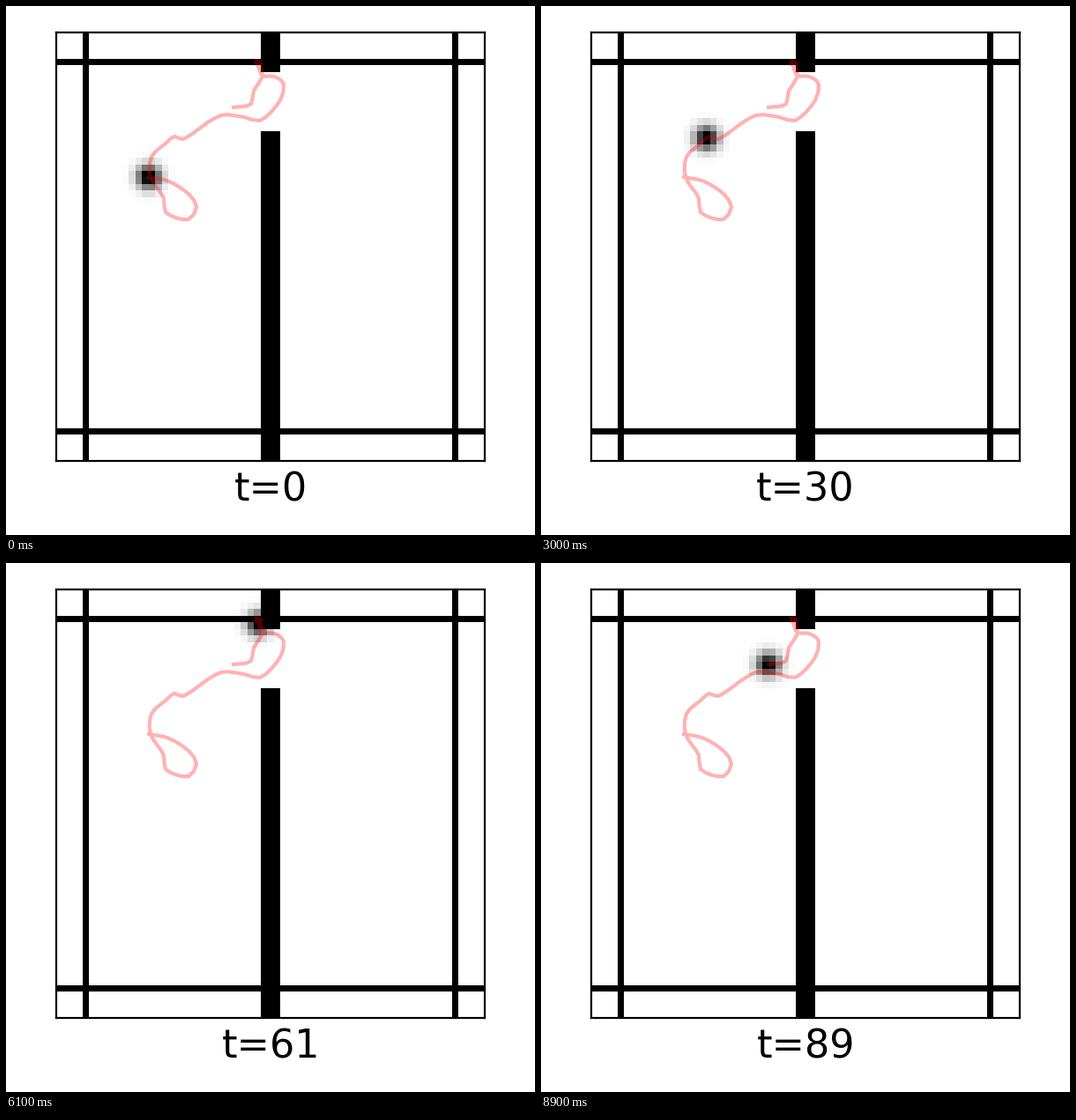
Write a matplotlib script that moves like this. It is 600 px wide and 600 px high and loops after 9000 ms.

```python
import numpy as np
import matplotlib.pyplot as plt
from matplotlib.animation import FuncAnimation

STAGE, DPI = 600, 200
STEPS, INTERVAL = 90, 100
CELLS = 65
LEFT, TOP, SIDE = 57, 30, 486
CELL = SIDE / CELLS
SIGMA = 1.25
DWELL = 62, 79  # steps spent pushing against the wall

# Turning points of the walk: (step, x, y) in stage pixels, y pointing down.
TURNS = [
    (0, 162, 194), (4, 185, 199), (8, 208, 214), (10, 216, 228),
    (12, 207, 242), (16, 181, 234), (18, 179, 218), (22, 164, 194),
    (25, 165, 171), (28, 181, 156), (31, 191, 148), (33, 201, 151),
    (41, 244, 124), (44, 270, 126), (46, 288, 130), (50, 311, 107),
    (52, 315, 89), (55, 304, 80), (58, 291, 79), (62, 286, 67),
    (79, 288, 67), (81, 291, 80), (83, 281, 96), (85, 278, 111),
    (89, 258, 115),
]


def spline(t, knots, p):
    """Catmull-Rom curve through p at the given knots."""
    m = np.empty(len(p))
    m[1:-1] = (p[2:] - p[:-2]) / (knots[2:] - knots[:-2])
    m[0] = (p[1] - p[0]) / (knots[1] - knots[0])
    m[-1] = (p[-1] - p[-2]) / (knots[-1] - knots[-2])
    i = np.clip(np.searchsorted(knots, t, side="right") - 1, 0, len(p) - 2)
    h = knots[i + 1] - knots[i]
    u = (t - knots[i]) / h
    ease = u * u * (3 - 2 * u)
    return (p[i] + (p[i + 1] - p[i]) * ease
            + h * u * (1 - u) * (m[i] * (1 - u) - m[i + 1] * u))


def walk():
    t = np.arange(STEPS)
    knots, xs, ys = np.array(TURNS, float).T
    x, y = spline(t, knots, xs), spline(t, knots, ys)
    start, end = DWELL
    s = np.clip(t - start, 0, end - start)
    sway = np.sin(np.pi * s / (end - start))
    return x + 3 * sway * np.sin(2.1 * s), y + 2 * sway * np.sin(1.4 * s)


def make_walls():
    walls = np.zeros((CELLS, CELLS))
    for k in (4, 60):
        walls[k, :] = walls[:, k] = 1
    walls[:, 31:34] = 1
    walls[6:15, 31:34] = 0  # doorway
    return walls


def bump(x, y):
    """Gaussian around a stage position, scaled so its darkest cell is 1."""
    i = np.arange(CELLS) + 0.5
    gx = np.exp(-((i - (x - LEFT) / CELL) / SIGMA) ** 2 / 2)
    gy = np.exp(-((i - (y - TOP) / CELL) / SIGMA) ** 2 / 2)
    return np.outer(gy / gy.max(), gx / gx.max())


path_x, path_y = walk()
walls = make_walls()

plt.rcParams["font.family"] = "DejaVu Sans"
fig = plt.figure(figsize=(STAGE / DPI, STAGE / DPI), dpi=DPI, facecolor="white")
ax = fig.add_axes([LEFT / STAGE, 1 - (TOP + SIDE) / STAGE,
                   SIDE / STAGE, SIDE / STAGE])
image = ax.imshow(walls, cmap="gray_r", vmin=0, vmax=1, aspect="auto",
                  interpolation="nearest",
                  extent=(LEFT, LEFT + SIDE, TOP + SIDE, TOP))
ax.plot(path_x, path_y, color="red", alpha=0.3, lw=1.5)
ax.set(xlim=(LEFT, LEFT + SIDE), ylim=(TOP + SIDE, TOP), xticks=[], yticks=[])
label = ax.set_xlabel("t=0", fontsize=16)


def update(t):
    image.set_data(np.maximum(walls, bump(path_x[t], path_y[t])))
    label.set_text(f"t={t}")
    return image, label


anim = FuncAnimation(fig, update, frames=STEPS, interval=INTERVAL,
                     repeat=True, repeat_delay=0, blit=False)
plt.show()
```
